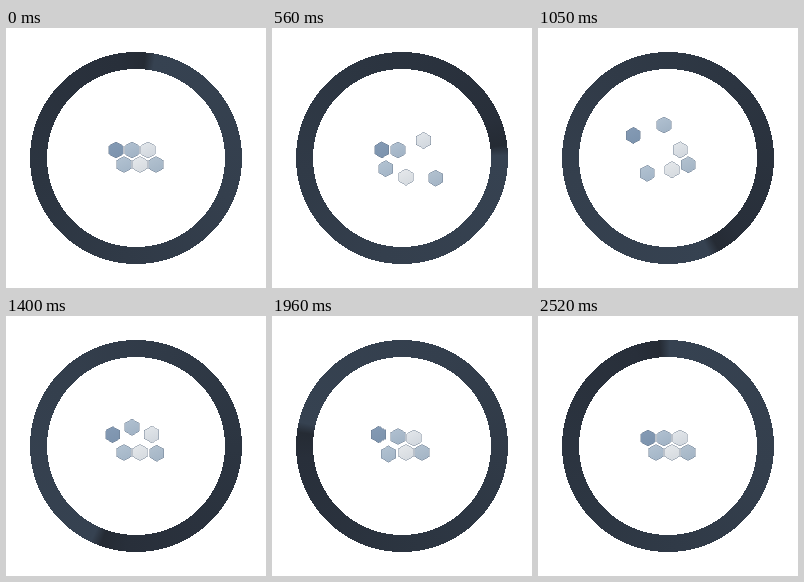
Write an HTML page that moves like this. It is 260x260 px and loops after 2.59 s.

```html
<!DOCTYPE html>
<html lang="en">
<head>
<meta charset="utf-8">
<title>Loading</title>
<style>
  html, body { margin: 0; width: 100%; height: 100%; overflow: hidden; background: #fff; }
  svg { position: absolute; inset: 0; width: 260px; height: 260px; }
  .ring {
    --band: radial-gradient(circle at center, transparent 89px, #000 89px 106px, transparent 106px);
    position: absolute; left: 0; top: 0; width: 260px; height: 260px;
    -webkit-mask: var(--band);
    mask: var(--band);
  }
  polygon { stroke: #66758a; stroke-width: .45; shape-rendering: crispEdges; }
</style>
</head>
<body>
<div class="ring"></div>
<svg viewBox="0 0 260 260"><defs></defs></svg>
<script>
const LOOP = 2590, STEP = 70;
const NS = 'http://www.w3.org/2000/svg';
const svg = document.querySelector('svg');
const defs = document.querySelector('defs');
const ring = document.querySelector('.ring');

// path: start, peak, landing, hop start, hop top, hop end (ms)
const cells = [
  { x: 110, y: 122, dx: -1, dy: -1, from: '#849ab4', to: '#7c93ad', high: 15.5, hop: 3.5, path: [530, 950, 1600, 1600, 1950, 2250] },
  { x: 126, y: 122, dx: 0, dy: -1, from: '#b0c0d0', to: '#a0b2c4', high: 25, hop: 4, path: [700, 1040, 1700, 1850, 2120, 2400] },
  { x: 142, y: 122, dx: 1, dy: -1, from: '#e2e6ea', to: '#d0d6dd', high: 12.5, hop: 3.5, path: [0, 350, 1000, 1000, 1400, 1750] },
  { x: 118, y: 136.5, dx: -1, dy: 1, from: '#b2c2d1', to: '#a3b5c7', high: 14, hop: 3.5, path: [420, 800, 1400, 1500, 1800, 2100] },
  { x: 134, y: 136.5, dx: 0, dy: 1, from: '#e5e8eb', to: '#d5dadf', high: 14, hop: 4, path: [280, 630, 1350, 1400, 1700, 1950] },
  { x: 150, y: 136.5, dx: 1, dy: 1, from: '#b2c1cf', to: '#a3b4c5', high: 14, hop: 3, path: [140, 500, 1100, 1300, 1600, 1850] }
];

function make(tag, attrs, parent) {
  const el = document.createElementNS(NS, tag);
  for (const key in attrs) el.setAttribute(key, attrs[key]);
  return parent.appendChild(el);
}

const hexagon = Array.from({ length: 6 }, (_, i) => {
  const a = i * Math.PI / 3;
  return `${(8.2 * Math.sin(a)).toFixed(2)},${(-8.2 * Math.cos(a)).toFixed(2)}`;
}).join(' ');

cells.forEach((c, i) => {
  const grad = make('linearGradient', { id: 'g' + i, x1: 0.3, y1: 0, x2: 0.7, y2: 1 }, defs);
  make('stop', { offset: 0, 'stop-color': c.from }, grad);
  make('stop', { offset: 1, 'stop-color': c.to }, grad);
  c.el = make('polygon', { points: hexagon, fill: `url(#g${i})` }, svg);
});

const ease = p => (1 - Math.cos(Math.PI * p)) / 2;

function arc(t, start, top, end) {
  if (t <= start || t >= end) return 0;
  return t < top ? ease((t - start) / (top - start)) : ease((end - t) / (end - top));
}

function draw(t) {
  const turn = 5 + 360 * t / LOOP;
  ring.style.background =
    `conic-gradient(from ${turn}deg, #252b34, #364251 1.6%, #343f4d 30%, #2c3541 70%, #282f3a 96%, #252b34)`;
  for (const c of cells) {
    const [a, b, d, e, f, g] = c.path;
    const out = c.high * arc(t, a, b, d) + c.hop * arc(t, e, f, g);
    c.el.setAttribute('transform', `translate(${c.x + c.dx * out} ${c.y + c.dy * out})`);
  }
}

const begin = performance.now();
function tick() {
  const t = (performance.now() - begin) % LOOP;
  draw(Math.floor(t / STEP) * STEP);
  requestAnimationFrame(tick);
}
tick();
</script>
</body>
</html>
```
